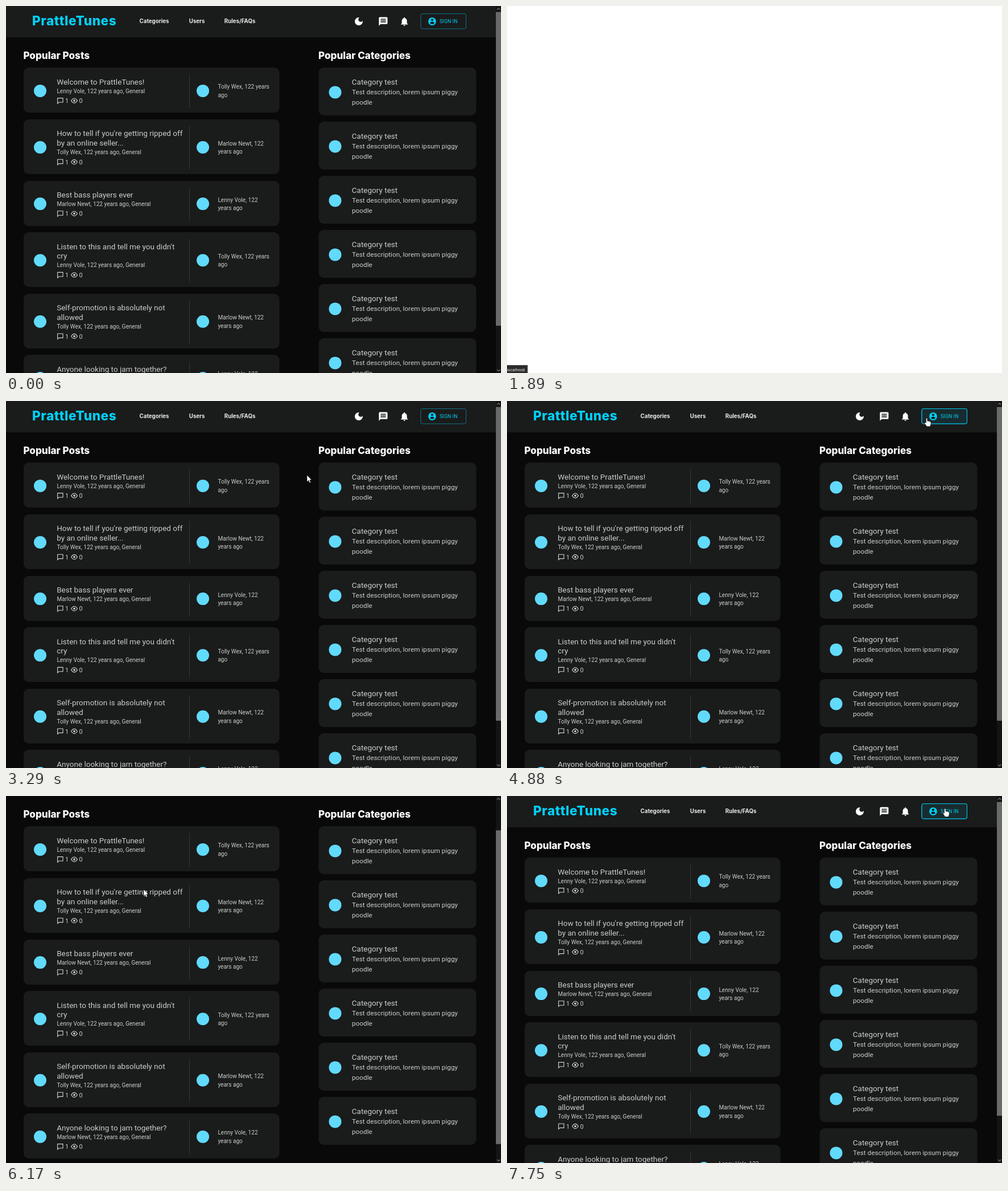
These frames come from a looping animation (870 by 644 pixels, 8000 ms). An HTML page:

```html
<!DOCTYPE html>
<html lang="en">
<head>
<meta charset="utf-8">
<title>Forum home</title>
<style>
html, body { margin: 0; width: 100%; height: 100%; overflow: hidden; background: #090909; }
svg { display: block; width: 870px; height: 644px; }
text { font-family: Roboto, sans-serif; fill: #cbcccc; white-space: pre; }
.h { font: 800 17.1px Inter, sans-serif; fill: #fff; }
.logo { font: 800 22.6px Inter, sans-serif; fill: #00d1fa; letter-spacing: .6px; }
.nav { font: 700 9.7px Inter, sans-serif; fill: #ececec; }
.btn { font-size: 8.8px; fill: #00cdf5; letter-spacing: .15px; }
.title { font-size: 13.5px; }
.desc { font-size: 11.8px; }
.meta { font-size: 10.06px; }
.num { font-size: 10.8px; }
.status { font: 7.72px "Noto Sans", sans-serif; fill: #f4f4f4; }
</style>
</head>
<body>
<svg id="stage" viewBox="0 0 870 644"></svg>
<script>
const LOOP = 8000, STEP = 99.4;
const stage = document.getElementById('stage');
const $ = id => document.getElementById(id);

const text = (cls, x, y, s) => `<text class="${cls}" x="${x}" y="${y}">${s}</text>`;
const avatar = (x, y) => `<circle cx="${x}" cy="${y}" r="11" fill="#61dafb"/>`;

// Card edges sit on whole pixels
function card(x, y, w, h) {
  const top = Math.round(y), bottom = Math.round(y + h);
  return `<rect x="${x}" y="${top}" width="${w}" height="${bottom - top}" rx="9" fill="#1a1b1b"/>`;
}

const [LEN, TOL, MAR] = ['Lenny Vole', 'Tolly Wex', 'Marlow Newt'];
const posts = [
  [['Welcome to PrattleTunes!'], LEN, TOL],
  [["How to tell if you're getting ripped off", 'by an online seller...'], TOL, MAR],
  [['Best bass players ever'], MAR, LEN],
  [["Listen to this and tell me you didn't", 'cry'], LEN, TOL],
  [['Self-promotion is absolutely not', 'allowed'], TOL, MAR],
  [['Anyone looking to jam together?'], MAR, LEN]
];

function counters(y) {
  return `<g fill="none" stroke="#d4d4d4" stroke-width="1.1">
    <path d="M90.6 ${y + 5}v-9.5h9.4v7.4h-7.2z"/>
    <path d="M114.6 ${y}q5.4-8.2 10.8 0q-5.4 8.2-10.8 0z"/></g>
    <circle cx="120" cy="${y}" r="1.8" fill="#d4d4d4"/>`
    + text('num', 104, y + 4, '1') + text('num', 128.6, y + 4, '0');
}

function postList() {
  let y = 108.3, out = '';
  for (const [lines, author, replier] of posts) {
    const extra = (lines.length - 1) * 17, h = 79 + extra, mid = y + h / 2 + 1.1;
    const reply = replier === TOL ? [', 122 years', 'ago'] : [', 122', 'years ago'];
    out += card(31, y, 449.5, h) + avatar(60, mid)
      + lines.map((s, i) => text('title', 89.2, y + 29.4 + i * 16.8, s)).join('')
      + text('meta', 89.4, y + 44.3 + extra, `${author}, 122 years ago, General`)
      + counters(y + 57.8 + extra)
      + `<path d="M322.5 ${y + 12}V${y + h - 8}" stroke="#343535"/>`
      + avatar(346, mid)
      + text('meta', 372.4, mid - 3.5, replier + reply[0])
      + text('meta', 372.4, mid + 11, reply[1]);
    y += h + 11.6;
  }
  return out;
}

function categoryList() {
  let out = '';
  for (let i = 0; i < 6; i++) {
    const y = 108.2 + i * 95;
    out += card(549.5, y, 277, 83.5) + avatar(578.5, y + 43.2)
      + text('title', 607.8, y + 29.4, 'Category test')
      + text('desc', 608, y + 46.6, 'Test description, lorem ipsum piggy')
      + text('desc', 608, y + 64.5, 'poodle');
  }
  return out;
}

const headerIcons = `
  <path fill="#fff" d="M620 20a7 7 0 1 0 7 7c0-.35 0-.7-.1-1a4.2 4.2 0 1 1-5.8-5.9 7 7 0 0 0-1.1-.1z"/>
  <path fill="#fff" d="M657 19.5h12q1.5 0 1.5 1.5v9.2q0 1.5-1.5 1.5h-10.6l-3 3V21q0-1.5 1.6-1.5z"/>
  <path stroke="#1a1b1b" stroke-width="1.4" d="M658.4 23.2h9.2M658.4 25.6h9.2M658.4 28h9.2"/>
  <path fill="#fff" d="M694.2 32.6v-.8l1.5-1.5v-3.9c0-2.4 1.2-4.3 3.4-4.8v-.5a1.1 1.1 0 0 1 2.2 0v.5c2.2.5 3.4 2.4 3.4 4.8v3.9l1.5 1.5v.8zM698.6 33.3h3.2a1.6 1.6 0 0 1-3.2 0z"/>`;

const signIn = `
  <rect id="glow" x="729" y="13.5" width="79.5" height="26.5" rx="3" fill="#00cdf5" fill-opacity=".09" stroke="#00cdf5"/>
  <rect x="729" y="13.5" width="79.5" height="26.5" rx="3" fill="none" stroke="#00cdf5" stroke-opacity=".5"/>
  <circle cx="749" cy="27" r="6.9" fill="#00cdf5"/>
  <circle cx="749" cy="24.3" r="2.1" fill="#1a1b1b"/>
  <path d="M744.9 29.7q4.1-4.2 8.2 0a5 5 0 0 1-8.2 0z" fill="#1a1b1b"/>
  ${text('btn', 762, 30.2, 'SIGN IN')}`;

stage.innerHTML = `
  <rect width="870" height="644" fill="#090909"/>
  <g id="page">
    <rect width="870" height="55" fill="#1a1b1b"/>
    <g id="left">
      ${text('logo', 46, 34.4, 'PrattleTunes')}
      ${text('nav', 234.6, 30.3, 'Categories')}
      ${text('nav', 321.8, 30.3, 'Users')}
      ${text('nav', 383.8, 30.3, 'Rules/FAQs')}
      ${text('h', 30.4, 93, 'Popular Posts')}
    </g>
    <g id="tools">${headerIcons}${signIn}</g>
    <g id="catHead">${text('h', 549, 93, 'Popular Categories')}</g>
    <g id="lists">${postList()}${categoryList()}</g>
    <g id="spinners" fill="none" stroke="#00cdf5" stroke-width="2.5">
      <path id="arcA"/><path id="arcB"/>
    </g>
  </g>
  <g id="bar">
    <rect x="861" width="9" height="644" fill="#131414"/>
    <rect id="thumb" x="861" width="9" height="550.5" fill="#696a6a"/>
    <path d="M863 6.5l2.7-2.7 2.7 2.7M863 638l2.7 2.7 2.7-2.7" fill="none" stroke="#777" stroke-width="1.2"/>
  </g>
  <rect id="blank" width="870" height="644" fill="#fff"/>
  <g id="status">
    <rect id="statusBox" x="-1" y="630.5" height="14" fill="#2b2b2b" stroke="#555"/>
    <text id="statusText" class="status" x="-1" y="641.4"></text>
  </g>
  <g id="cursor" fill="#fff" stroke="#000" stroke-width=".6" stroke-linejoin="round">
    <path id="arrow" d="M0 0V12L2.8 9.5 4.7 13.9 6.7 13 4.8 8.7H8.4z"/>
    <path id="hand" d="M-1.3 8V.8q1.2-1.7 2.4 0V5q1.3-.8 2.2.4q1.2-.7 2 .4q1.8-.4 2 1.3V10.6L5.9 14.6H0L-3.6 9.3q-.4-1.9 1.1-1.6z"/>
  </g>`;

// Piecewise linear track of [time, ...values]
function track(keys, t) {
  let i = 0;
  while (i < keys.length - 2 && t >= keys[i + 1][0]) i++;
  const a = keys[i], b = keys[i + 1];
  const k = Math.min(1, Math.max(0, (t - a[0]) / (b[0] - a[0])));
  return a.slice(1).map((v, n) => v + (b[n + 1] - v) * k);
}

const pointer = [
  [95, 651, 515], [890, 313, 59], [990, 210, 28], [1090, 105, 1],
  [2090, 340, 82], [2190, 372, 95], [2690, 462, 120], [2790, 470, 121], [3090, 528, 129],
  [3290, 529, 130], [3390, 521, 121], [3490, 529, 130], [3700, 529, 130],
  [4380, 766, 30], [4480, 769, 22], [4780, 769, 22], [4980, 700, 40], [5570, 240, 122], [5670, 237, 122],
  [5870, 245, 116], [6080, 245, 116], [6570, 226, 398], [7060, 226, 398],
  [7460, 757, 46], [7560, 765, 36], [7750, 770, 22], [8000, 770, 22]
];
const scroll = [
  [5690, 0], [5770, 8], [5865, 25], [5980, 47], [6080, 55],
  [6850, 55], [6960, 36], [7160, 0], [8000, 0]
];
const hovers = [[4370, 4940], [7550, 9000]];

const unit = v => Math.min(1, Math.max(0, v));
const show = (id, on) => $(id).setAttribute('display', on ? 'inline' : 'none');
const move = (id, x, y) => $(id).setAttribute('transform', `translate(${x} ${y})`);

function arc(cx, t) {
  const age = t / 700, turn = t / 1400 * 2 * Math.PI;
  const sweep = .12 + 4.6 * age * age * (3 - 2 * age);
  const at = a => `${cx + 12.6 * Math.sin(a)} ${126.6 - 12.6 * Math.cos(a)}`;
  return `M${at(turn)}A12.6 12.6 0 ${sweep > Math.PI ? 1 : 0} 1 ${at(turn + sweep)}`;
}

function draw(t) {
  const loading = t >= 1880 && t < 2375;
  const blank = t >= 1880 && t < 2080;
  const spin = t >= 2180 && loading;
  const top = Math.round(track(scroll, t)[0]);

  move('page', 0, -top);
  move('left', loading ? .8 : 0, 0);
  move('tools', loading ? 11.2 : 0, 0);
  move('catHead', loading ? 7.7 : 0, 0);
  show('lists', !loading);
  show('bar', !loading);
  $('thumb').setAttribute('y', 10.5 + top * .905);
  show('blank', blank);

  show('spinners', spin);
  if (spin) {
    $('arcA').setAttribute('d', arc(58.5, t - 2180));
    $('arcB').setAttribute('d', arc(584.7, t - 2180));
  }

  const early = t < 1980;
  show('status', t >= 1880 && t < 2580);
  $('statusBox').setAttribute('width', early ? 37 : 128);
  $('statusText').textContent = early ? 'localhost' : 'Transferring data from localhost...';

  const glow = Math.max(...hovers.map(([a, b]) => unit((t - a) / 200) * (1 - unit((t - b) / 200))));
  $('glow').setAttribute('opacity', glow);

  const [x, y] = track(pointer, t);
  const over = x > 729 && x < 809 && y > 13 && y < 40;
  show('cursor', t >= 90 && (t < 1180 || t >= 2080));
  show('arrow', !over);
  show('hand', over);
  move('cursor', x, y);
}

function tick() {
  // The picture advances about ten times a second, like a screen recording
  const t = performance.now() % LOOP;
  draw(Math.floor((t + 12) / STEP) * STEP);
  requestAnimationFrame(tick);
}
tick();
</script>
</body>
</html>
```
